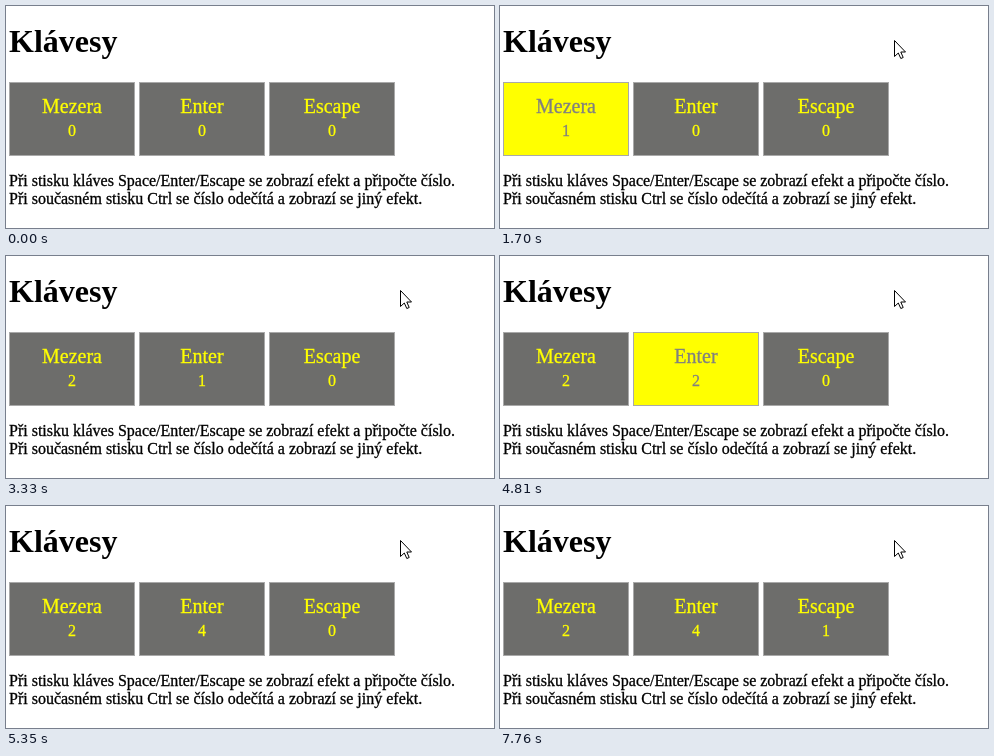
Animation, 488 px wide and 222 px high, one loop 8 s. Source, as an HTML page:

```html
<!DOCTYPE html>
<html lang="cs">
<head>
<meta charset="utf-8">
<title>Klávesy</title>
<style>
  html, body { margin: 0; width: 100%; height: 100%; overflow: hidden; background: #fff; }
  svg { display: block; width: 488px; height: 222px; font: 16px "Liberation Serif", "Times New Roman", serif; }
  text { fill: currentColor; stroke: currentColor; stroke-width: .3px; }
  .title { font-size: 32px; font-weight: bold; stroke: none; }
  .key { text-anchor: middle; color: #ff0; }
  .key rect { fill: #6d6d6b; stroke: #a9a9a9; }
  .key .name { font-size: 20px; }
  .key.on { color: #808080; }
  .key.on rect { fill: #ff0; }
  #cursor { fill: #fff; stroke: #000; stroke-linejoin: round; }
</style>
</head>
<body>
<svg viewBox="0 0 488 222">
  <text class="title" x="3" y="46">Klávesy</text>
  <g id="keys"></g>
  <text x="3" y="180">Při stisku kláves Space/Enter/Escape se zobrazí efekt a připočte číslo.</text>
  <text x="3" y="198">Při současném stisku Ctrl se číslo odečítá a zobrazí se jiný efekt.</text>
  <circle id="click" cx="394" cy="34" r="12" fill="#ff0" fill-opacity=".47" visibility="hidden"/>
  <path id="cursor" d="M.5 .5V16.5L4.3 13L6.8 18.5L9.2 17.5L6.8 12H11.5Z" visibility="hidden"/>
</svg>
<script>
const LOOP = 8000;
const MOVE = { start: 150, end: 460, steps: 4, from: [406, 102], to: [394, 34] };
const CLICK = [610, 770];

// Each press is [down, up] in ms
const keys = [
  { name: 'Mezera', presses: [[1700, 1850], [2710, 2860]] },
  { name: 'Enter', presses: [[3260, 3330], [4810, 4890], [4970, 5050], [5310, 5350]] },
  { name: 'Escape', presses: [[7680, 7760]] }
];

const byId = id => document.getElementById(id);
const within = (t, [a, b]) => t >= a && t < b;
const show = (el, on) => el.setAttribute('visibility', on ? 'visible' : 'hidden');

function add(parent, tag, attrs, text = '') {
  const el = document.createElementNS('http://www.w3.org/2000/svg', tag);
  for (const k in attrs) el.setAttribute(k, attrs[k]);
  el.textContent = text;
  return parent.appendChild(el);
}

keys.forEach((key, i) => {
  key.box = add(byId('keys'), 'g', { class: 'key', transform: `translate(${3 + i * 130} 76)` });
  add(key.box, 'rect', { x: .5, y: .5, width: 125, height: 73 });
  add(key.box, 'text', { class: 'name', x: 63, y: 31 }, key.name);
  key.count = add(key.box, 'text', { x: 63, y: 54 }, '0');
});

function drawCursor(t) {
  const { start, end, steps, from, to } = MOVE;
  const p = Math.min(1, Math.max(0, (t - start) / (end - start)));
  const rest = Math.pow(1 - Math.floor(p * steps) / steps, 1.5);
  const [x, y] = to.map((v, i) => Math.round(v + (from[i] - v) * rest));
  const cursor = byId('cursor');
  cursor.setAttribute('transform', `translate(${x} ${y})`);
  show(cursor, t >= start);
  show(byId('click'), within(t, CLICK));
}

function draw(now) {
  const t = now % LOOP;
  drawCursor(t);
  for (const { box, count, presses } of keys) {
    box.classList.toggle('on', presses.some(p => within(t, p)));
    count.textContent = presses.filter(p => t >= p[0]).length;
  }
}

const began = performance.now();
function tick() {
  draw(performance.now() - began);
  requestAnimationFrame(tick);
}
tick();
</script>
</body>
</html>
```
